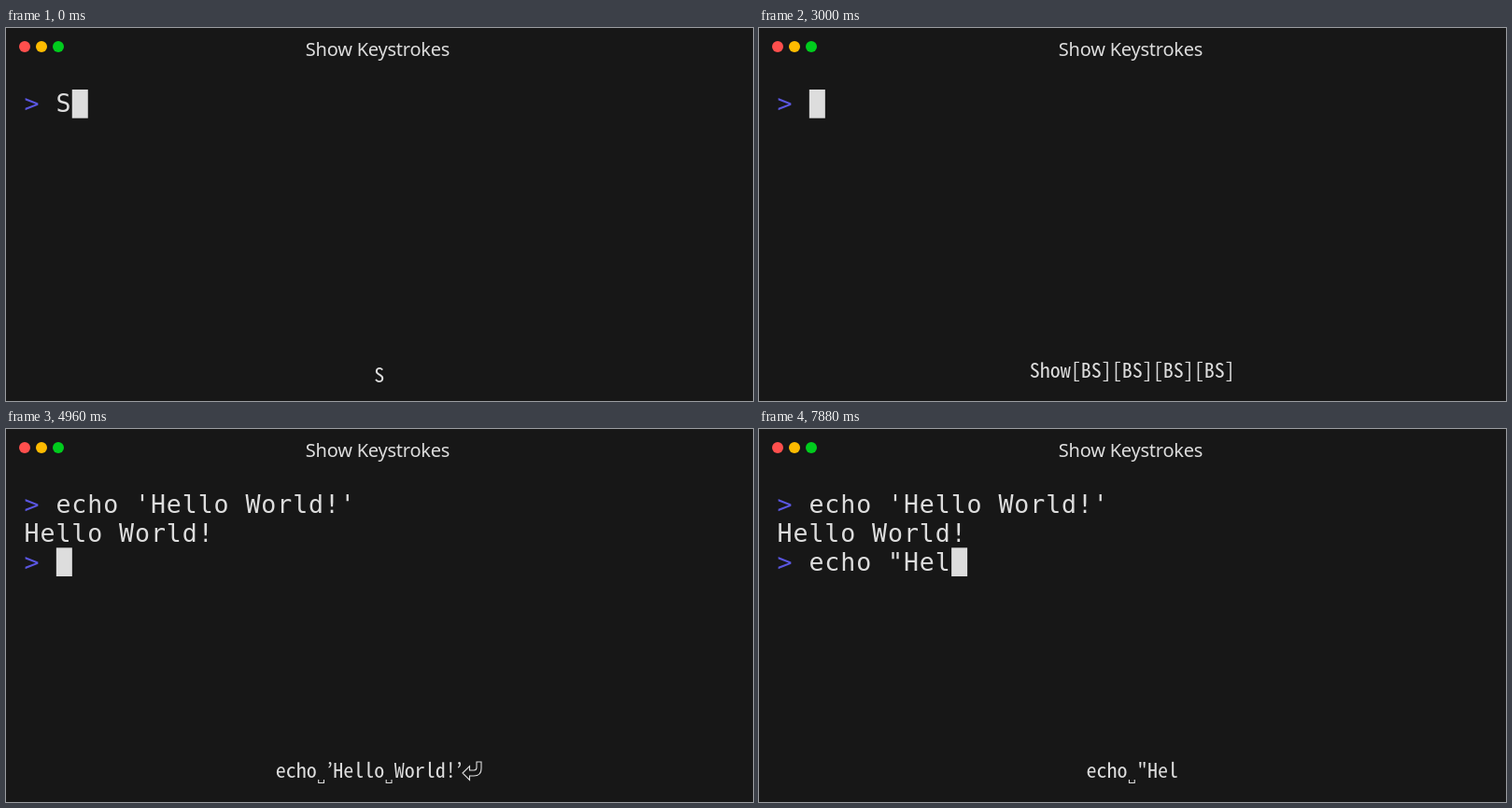
Animation of 800 by 400 pixels, one loop 8 s. Source, as an HTML page:

```html
<!DOCTYPE html>
<html lang="en">
<head>
<meta charset="utf-8">
<title>Show Keystrokes</title>
<style>
  html, body { margin: 0; width: 100%; height: 100%; overflow: hidden; background: #171717; }
  svg { display: block; width: 100%; height: 100%; }
  text { white-space: pre; fill: #dddddd; }
  .term { font: 26.6px "DejaVu Sans Mono", monospace; letter-spacing: 0.905px; }
  .prompt { fill: #5a56e0; }
  .title { font: 20px "Noto Sans", "Open Sans", sans-serif; letter-spacing: -0.22px; }
  .keys { font: 22px "Noto Sans Mono CJK JP", "Noto Sans Mono CJK SC", "Liberation Mono", monospace; }
  .quotes { font: 22px "Noto Sans CJK KR", "Noto Sans CJK JP", "Noto Sans", sans-serif; }
  .marks { fill: none; stroke: #dddddd; stroke-width: 1.1; }
</style>
</head>
<body>
<svg viewBox="0 0 800 400">
  <rect width="800" height="400" fill="#171717"/>
  <circle cx="20" cy="20" r="6" fill="#ff4f4d"/>
  <circle cx="38" cy="20" r="6" fill="#febb00"/>
  <circle cx="56" cy="20" r="6" fill="#00cc1d"/>
  <text class="title" x="398" y="30" text-anchor="middle">Show Keystrokes</text>
  <g class="term">
    <text class="prompt" x="19.6" y="90.4">&gt;</text>
    <text id="line1" x="53.4" y="90.4"></text>
    <text id="output" x="19.6" y="121.1"></text>
    <text id="prompt2" class="prompt" x="19.6" y="151.7"></text>
    <text id="line2" x="53.4" y="151.7"></text>
  </g>
  <rect id="cursor" width="17" height="30.7" fill="#dddddd"/>
  <text id="keys" class="keys"></text>
  <text id="quotes" class="quotes"></text>
  <path id="marks" class="marks"/>
</svg>
<script>
const LOOP = 8000, CELL = 16.92, ROW = 30.66, KEY = 11, MAX_KEYS = 20;
const el = id => document.getElementById(id);
const ui = {};
for (const id of ["line1", "output", "prompt2", "line2", "cursor", "keys", "quotes", "marks"]) ui[id] = el(id);

const snap = ms => Math.round(ms / 40) * 40;
const typed = (text, start, step) =>
  [...text].map((ch, i) => ({ ch, at: snap(start + i * step) }));

// "\b" is backspace, "\n" is enter; lag delays only the terminal echo
const first = [
  { ch: "S", at: 0 }, { ch: "h", at: 280 }, { ch: "o", at: 520, lag: 40 }, { ch: "w", at: 760 },
  { ch: "\b", at: 1040 }, { ch: "\b", at: 1280 }, { ch: "\b", at: 1520, lag: 40 }, { ch: "\b", at: 1800 },
  ...typed("echo 'Hello World!'\n", 3040, 101.5)
];
const second = typed('echo "Hel', 7070, 101);
const ENTER = 4960, RESTART = 7080;
const blinkOff = [[2400, 3000], [5560, 6160], [6760, RESTART]];

const label = { "\b": "[BS]", "\n": "⏎", " ": "␣", "'": "’" };
const advance = { "␣": 10.5, "’": 7, "⏎": 22 };

function lineAt(events, t) {
  let line = "";
  for (const { ch, at, lag = 0 } of events) {
    if (t < at + lag || ch === "\n") break;
    line = ch === "\b" ? line.slice(0, -1) : line + ch;
  }
  return line;
}

function keysAt(events, t) {
  const shown = events.filter(e => e.at <= t).map(e => label[e.ch] || e.ch).join("");
  return [...shown].slice(-MAX_KEYS);
}

const spaceMark = (x, y) => `M${x + 2} ${y + 2}v3.5h5.8v-3.5`;
const enterMark = (x, y) =>
  `M${x + 0.3} ${y - 5}l7.5 -7.5v4.5h4.5q3 0 3 -3v-6h5v7q0 8 -8 8h-4.5v4.5z`;

function place(node, text, xs, y) {
  node.setAttribute("x", xs.join(" "));
  node.setAttribute("y", y);
  node.textContent = text;
}

function drawKeys(chars) {
  // The lowest glyph rests on y = 380
  const y = chars.includes("␣") ? 374 : chars.some(c => "[]".includes(c)) ? 375 : 380;
  const width = c => advance[c] || KEY;
  let x = 399.7 - chars.reduce((sum, c) => sum + width(c), 0) / 2;
  let text = "", quotes = "", marks = "";
  const xs = [], quoteXs = [];
  for (const c of chars) {
    if (c === "␣") marks += spaceMark(x, y);
    else if (c === "⏎") marks += enterMark(x, y);
    else if (c === "’") { quotes += c; quoteXs.push(x + 0.6); }
    else { text += c; xs.push(x); }
    x += width(c);
  }
  place(ui.keys, text, xs, y);
  place(ui.quotes, quotes, quoteXs, y);
  ui.marks.setAttribute("d", marks);
}

let last = "";
function render(t) {
  const done = t >= ENTER;
  const line1 = lineAt(first, t), line2 = lineAt(second, t);
  const keys = keysAt(t < RESTART ? first : second, t);
  const visible = !blinkOff.some(([a, b]) => t >= a && t < b);
  const state = [line1, line2, keys.join(""), visible, done].join("|");
  if (state === last) return;
  last = state;

  ui.line1.textContent = line1;
  ui.line2.textContent = line2;
  ui.output.textContent = done ? "Hello World!" : "";
  ui.prompt2.textContent = done ? ">" : "";
  const column = 2 + (done ? line2 : line1).length;
  ui.cursor.setAttribute("x", 20 + column * CELL);
  ui.cursor.setAttribute("y", 66 + (done ? 2 * ROW : 0));
  ui.cursor.setAttribute("visibility", visible ? "visible" : "hidden");
  drawKeys(keys);
}

const start = performance.now();
function tick() {
  render((performance.now() - start) % LOOP);
  requestAnimationFrame(tick);
}
tick();
</script>
</body>
</html>
```
